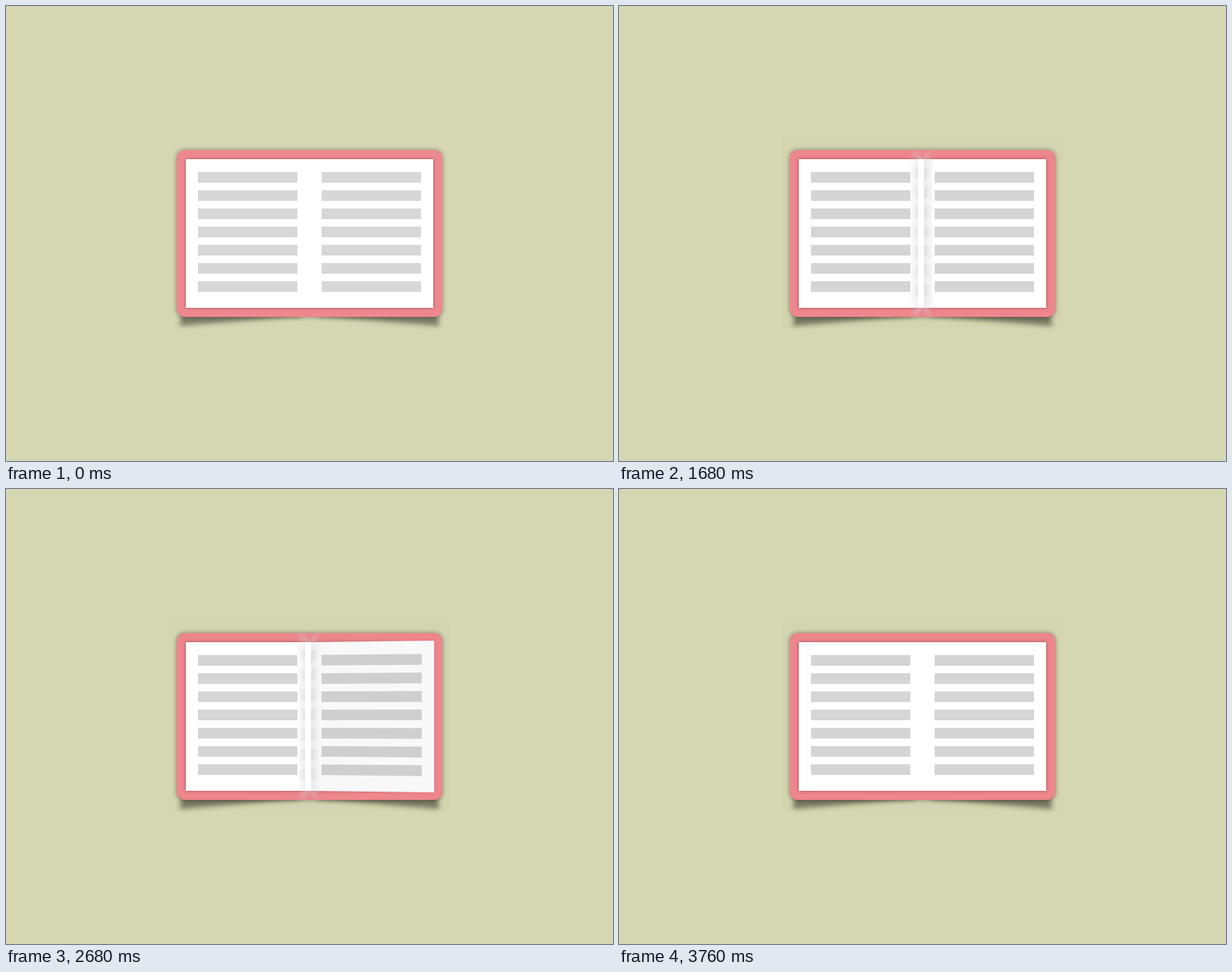
An HTML page with a canvas that plays this animation: 800 by 600 pixels, repeating every 4600 ms.

```html
<!DOCTYPE html>
<html lang="en">
<head>
<meta charset="utf-8">
<title>Turning pages</title>
<style>
  html, body { margin: 0; width: 100%; height: 100%; overflow: hidden; background: #d5d7b2; }
  canvas { display: block; width: 800px; height: 600px; }
</style>
</head>
<body>
<canvas id="stage" width="800" height="600"></canvas>
<script>
const LOOP = 4600, TURN = 1040, STARTS = [1024, 2024, 2380, 2732];
const SHUTTER = 17, SAMPLES = 16;
const CX = 400, CY = 300, PAGE_W = 163, PAGE_H = 98, DEPTH = 1250;
const BOX = [215, 175, 370, 250];

const makeLayer = () => Object.assign(document.createElement('canvas'), { width: 800, height: 600 });
const ctx = document.getElementById('stage').getContext('2d');
const base = makeLayer(), scene = makeLayer();
const sceneCtx = scene.getContext('2d');

// Cubic bezier (.87, 0, .48, 1)
function ease(u) {
  if (u <= 0) return 0;
  if (u >= 1) return 1;
  let lo = 0, hi = 1, s;
  for (let i = 0; i < 24; i++) {
    s = (lo + hi) / 2;
    const r = 1 - s;
    const x = 3 * r * r * s * .87 + 3 * r * s * s * .48 + s * s * s;
    if (x < u) lo = s; else hi = s;
  }
  return s * s * (3 - 2 * s);
}

const grey = v => `rgb(${v},${v},${v})`;

function quad(c, angle, x0, y0, x1, y1) {
  c.beginPath();
  for (const [x, y] of [[x0, y0], [x1, y0], [x1, y1], [x0, y1]]) {
    const k = DEPTH / (DEPTH - x * Math.sin(angle));
    c.lineTo(CX + x * Math.cos(angle) * k, CY + y * k);
  }
  c.fill();
}

function drawPage(c, angle) {
  const light = 1 - .17 * Math.sin(angle);
  c.fillStyle = grey(Math.round(255 * light));
  quad(c, angle, 0, -PAGE_H, PAGE_W, PAGE_H);
  c.fillStyle = grey(Math.round(215 * light));
  for (let i = 0; i < 7; i++) {
    const y = -81 + 24 * i;
    quad(c, angle, 16, y, 147, y + 14);
  }
}

function drawBase(c) {
  c.fillStyle = '#d5d7b2';
  c.fillRect(0, 0, 800, 600);

  // Lifted corner shadows
  c.filter = 'blur(3px)';
  c.fillStyle = 'rgba(0,0,0,.42)';
  for (const side of [-1, 1]) {
    c.beginPath();
    for (const [x, y] of [[168, 400], [171, 422], [10, 409], [10, 400]]) c.lineTo(CX + side * x, y);
    c.fill();
  }
  c.filter = 'none';

  c.shadowColor = 'rgba(0,0,0,.4)';
  c.shadowBlur = 6;
  c.fillStyle = '#ee888f';
  c.beginPath();
  c.roundRect(225, 190, 350, 220, 10);
  c.fill();

  c.shadowColor = 'rgba(0,0,0,.35)';
  c.shadowBlur = 4;
  c.fillStyle = '#fff';
  c.fillRect(237, 202, 326, 196);
  c.shadowColor = 'transparent';
  drawPage(c, 0);
  drawPage(c, Math.PI);
}

function drawScene(t) {
  const angles = STARTS.map(s => Math.PI * ease((t - s) / TURN));
  const half = Math.PI / 2;
  sceneCtx.drawImage(base, 0, 0);
  angles.filter(a => a > 0 && a <= half).reverse().forEach(a => drawPage(sceneCtx, a));
  angles.filter(a => a > half && a < Math.PI).forEach(a => drawPage(sceneCtx, a));
  // Spine strip
  sceneCtx.fillStyle = '#fff';
  sceneCtx.fillRect(394, 202, 8, 196);
}

function render(t) {
  ctx.globalAlpha = 1;
  ctx.drawImage(base, 0, 0);
  if (!STARTS.some(s => t > s - SHUTTER && t < s + TURN + SHUTTER)) return;
  // Motion blur: running average over the open shutter
  for (let i = 0; i < SAMPLES; i++) {
    drawScene(t + SHUTTER * ((i + .5) / SAMPLES - .5));
    ctx.globalAlpha = 1 / (i + 1);
    ctx.drawImage(scene, ...BOX, ...BOX);
  }
}

drawBase(base.getContext('2d'));
const began = performance.now();
function tick() {
  render((performance.now() - began) % LOOP);
  requestAnimationFrame(tick);
}
tick();
</script>
</body>
</html>
```
